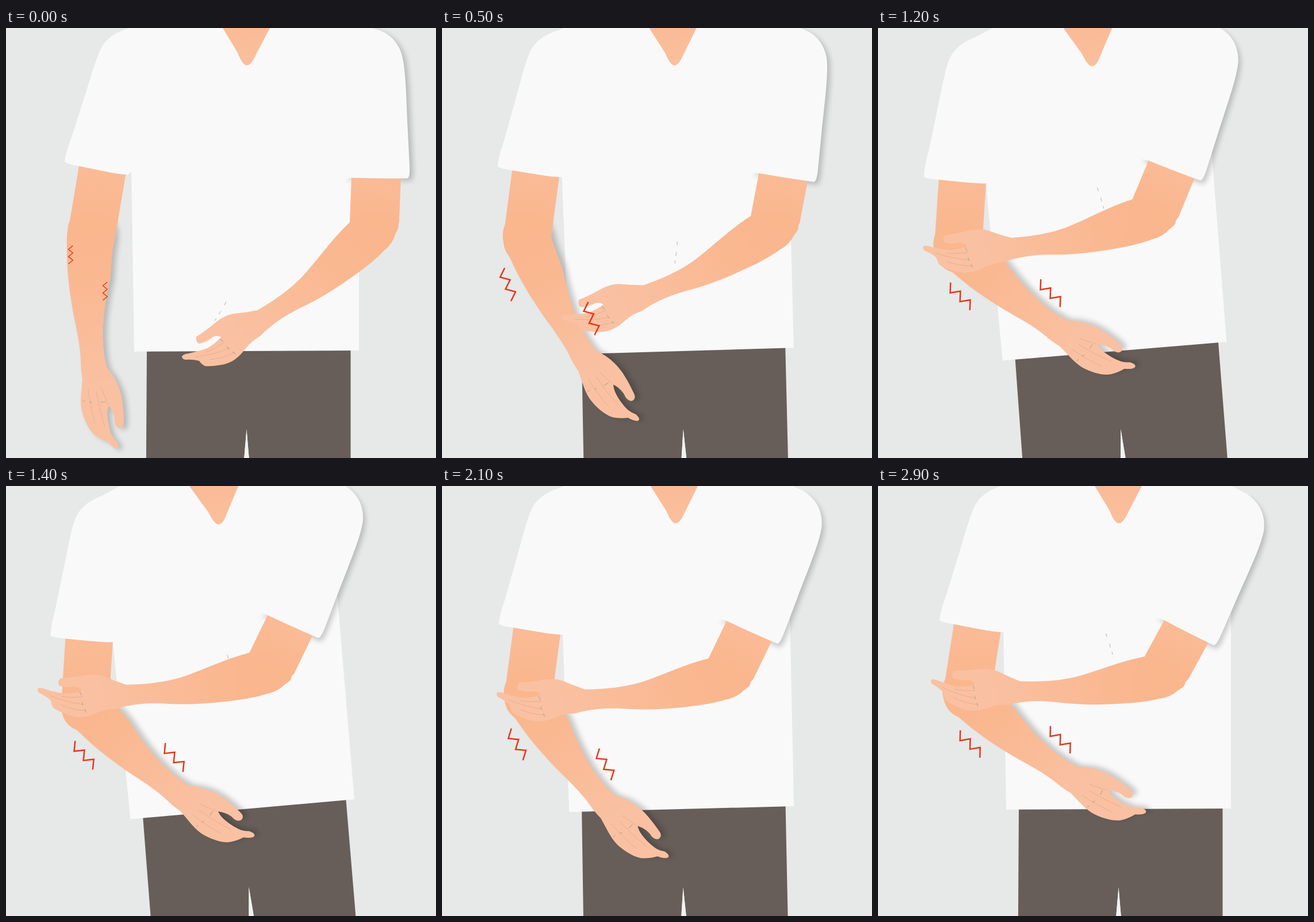
Write an HTML page that moves like this. It is 748 by 748 pixels and loops after 3 s.

```html
<!DOCTYPE html>
<html lang="en">
<head>
<meta charset="utf-8">
<title>Forearm pain</title>
<style>
  html, body { margin: 0; width: 100%; height: 100%; overflow: hidden; background: #e6e9e8; }
  svg { display: block; width: 100vw; height: 100vh; }
  .white { fill: #f9f9f9; }
  .shade { fill: #000; opacity: .2; filter: url(#soft); }
  .crease { fill: none; stroke: #dfa283; stroke-width: .8; stroke-opacity: .75; }
  .dash { fill: none; stroke: #b5a79c; stroke-width: 1.1; }
  .zig { fill: none; stroke: #e8351a; stroke-width: 2.5; }
</style>
</head>
<body>
<svg viewBox="0 0 748 748">
  <defs>
    <filter id="soft" x="-20%" y="-20%" width="140%" height="140%"><feGaussianBlur stdDeviation="5"/></filter>
    <linearGradient id="upperL" gradientUnits="userSpaceOnUse" x1="165" y1="240" x2="150" y2="355">
      <stop offset="0" stop-color="#fabb96"/><stop offset="1" stop-color="#fab68d"/>
    </linearGradient>
    <linearGradient id="foreL" gradientUnits="userSpaceOnUse" x1="148" y1="355" x2="160" y2="630">
      <stop offset="0" stop-color="#fab68d"/><stop offset=".3" stop-color="#fab891"/><stop offset="1" stop-color="#f9c1a2"/>
    </linearGradient>
    <linearGradient id="upperR" gradientUnits="userSpaceOnUse" x1="645" y1="262" x2="640" y2="350">
      <stop offset="0" stop-color="#fabb96"/><stop offset="1" stop-color="#fab68d"/>
    </linearGradient>
    <linearGradient id="foreR" gradientUnits="userSpaceOnUse" x1="640" y1="350" x2="400" y2="545">
      <stop offset="0" stop-color="#fab68d"/><stop offset=".3" stop-color="#fab891"/><stop offset="1" stop-color="#f9c1a2"/>
    </linearGradient>
    <linearGradient id="neck" x1="0" y1="0" x2="0" y2="1">
      <stop offset="0" stop-color="#fab993"/><stop offset="1" stop-color="#fabf9c"/>
    </linearGradient>
  </defs>
  <rect width="748" height="748" fill="#e6e9e8"/>

  <g data-rig="torso">
    <path fill="#675e59" d="M245 555H599.500V810H428L418.500 698L409 810H243.500Z"/>
    <path fill="#f1f3f2" d="M418.500 698L428 810H409Z"/>
    <path class="white" d="M255 -16L355 -60H500L608 -3Q640 14 640 70L614 200V561L223 563L218 240L205 60Z"/>
    <path fill="url(#neck)" d="M349 -50L377 0L403 43Q411 64.500 419 65Q427 64 434 48L459 0L484 -50Z"/>
  </g>

  <g data-rig="foreL"><path class="shade" data-copy="armL" transform="translate(7 3)"/></g>
  <g data-rig="sleeveL">
    <path fill="url(#upperL)" d="M129 228L210 240L208.500 253.500L188.500 372A41 41 0 0 1 107.500 360Q106 345 111 335Z"/>
    <path class="white" d="M300 -20L255 -16L215 0Q178 10 165 36C153 62 143 102 130 140Q122 166 113 193Q104 216 102 232Q104 236 126 240L170 249Q200 255 212 255L218 250L240 100Z"/>
  </g>
  <g data-rig="foreL">
    <path fill="url(#foreL)" data-copy="armL"/>
    <path class="crease" d="M143 628Q146 656 155 688M157 632Q162 664 172 694M166 626Q171 640 178 655"/>
    <path class="dash" d="M133 649H137.500M145 650L150 651.500M164 651.500L173 650"/>
    <path class="dash" stroke-opacity=".8" d="M383 476L380 482M374 492.500L370 498M366 505L363 509"/>
  </g>

  <g data-rig="sleeveR">
    <path class="shade" data-copy="sleeveEdge" transform="translate(6 4)"/>
  </g>
  <g data-rig="upperR">
    <path fill="url(#upperR)" d="M601.500 245H687.500L684 336Q680 350 676 362L625 380L598 338Z"/>
  </g>
  <g data-rig="sleeveR">
    <path class="white" data-copy="sleeve"/>
  </g>
  <g data-rig="foreR">
    <path fill="url(#foreR)" data-copy="armR"/>
    <path class="crease" d="M329 572Q360 569 389 557M348 564Q366 557 381 546M354 577Q380 574 398 564"/>
    <path class="dash" d="M372 541L378 545M384 554.500L389 559M394 563L399 567"/>
  </g>

  <g data-rig="pain">
    <path class="zig" data-copy="zig" transform="translate(-65 63)"/>
    <path class="zig" data-copy="zig" transform="translate(43 177)"/>
  </g>
</svg>
<script>
const LOOP = 3000, STEP = 100;

const sleeveOuter = "M632 0Q674 5 688 44C696 72 696 120 699 180L702 240Q703 261 698 261.500" +
  "Q648 262 601 260.500L585 262";

const shapes = {
  armL: "M109 346A41 41 0 0 1 189 353Q189 368 187 378C183 396 184 420 181 438" +
    "C174 470 167 510 169 545Q170 572 176 591Q190 607 196 624C203 640 205 666 205 688" +
    "Q204 696 197 696Q191 695 189 686Q190 672 179 657C173 668 178 694 184 708" +
    "Q187 714 193 720Q198 731 192 732Q186 731 178 720Q168 717 157 710" +
    "C146 703 135 682 131 662Q129 650 131 632L133 610Q130 596 130 576" +
    "C128 540 119 512 114 478C109 446 106 420 106 384Q105 354 109 346Z",
  armR: "M598 338Q625 318 660 322Q682 330 683 345Q681 352 678 357Q673 375 658 387" +
    "C642 404 622 419 605 431C572 455 540 474 510 488C482 502 462 516 442 536" +
    "Q428 544 418 556C404 575 392 583 374 586Q356 589 346 588Q340 585 336 579" +
    "Q324 576 312 577Q306 576 306 571Q309 567 318 566Q336 562 350 557Q364 549 374 538" +
    "Q371 534 361 537Q348 547 336 549Q330 547 331 537Q350 525 366 511" +
    "Q382 499 396 497Q417 495 437 491C468 473 492 456 514 434C542 404 564 370 598 338Z",
  sleeve: sleeveOuter + "L590 100L560 -2Z",
  sleeveEdge: sleeveOuter + "L612 242L650 60Z",
  zig: "M7-28.500" + [1, 2, 3, 4, 5].map(i => `L${i % 2 ? -7 : 7} ${-28.5 + 11.4 * i}`).join("")
};
for (const p of document.querySelectorAll("[data-copy]")) p.setAttribute("d", shapes[p.dataset.copy]);

// Keys are [seconds, value]; angles are in degrees, lift in pixels.
const tracks = {
  lean:   [[0, 0], [.15, .1], [.5, 1.4], [.9, 3.05], [1.2, 4.5], [1.35, 4.85], [1.7, 3.05], [2.1, 1.2], [2.4, 0]],
  shift:  [[0, 0], [.5, .65], [.9, 1.15], [1.25, 1.3], [1.7, .95], [2.1, .75], [2.4, .65]],
  lift:   [[0, 0], [.5, 4], [2.1, 4], [2.9, 1]],
  swing:  [[0, 0], [.5, 24.4], [.9, 46.2], [1.1, 49.2], [1.2, 48.6], [1.7, 38], [1.97, 33], [2.1, 33.8], [2.4, 41.5], [2.9, 49.3]],
  reach:  [[0, 0], [.5, 8.5], [.9, 15.5], [1.2, 20.4], [1.4, 23.7], [1.7, 24.1], [2.1, 23.6], [2.9, 26.4]],
  rub:    [[0, 0], [.5, 10.7], [.9, 19.5], [1.2, 25.9], [1.4, 29], [1.7, 29.7], [2.1, 29.4], [2.9, 32.4]],
  throb:  [[0, .555], [.2, 1.2], [.4, 1]]
};

// Monotone cubic interpolation: peaks lie exactly on keys.
function value(keys, t) {
  const n = keys.length;
  if (t <= keys[0][0]) return keys[0][1];
  if (t >= keys[n - 1][0]) return keys[n - 1][1];
  const i = keys.findIndex(k => k[0] > t) - 1;
  const slope = j => (keys[j + 1][1] - keys[j][1]) / (keys[j + 1][0] - keys[j][0]);
  const tangent = j => {
    if (j === 0 || j === n - 1) return slope(Math.min(j, n - 2)) * .7;
    const a = slope(j - 1), b = slope(j);
    return a * b <= 0 ? 0 : 2 * a * b / (a + b);
  };
  const [t0, v0] = keys[i], [t1, v1] = keys[i + 1];
  const h = t1 - t0, u = (t - t0) / h, w = 1 - u;
  return v0 * (1 + 2 * u) * w * w + v1 * u * u * (3 - 2 * u) +
    h * u * w * (tangent(i) * w - tangent(i + 1) * u);
}

const rotate = (a, x, y) => `rotate(${a.toFixed(3)} ${x} ${y}) `;
const move = (x, y) => `translate(${x.toFixed(2)} ${y.toFixed(2)}) `;
const parts = [...document.querySelectorAll("[data-rig]")];

function draw(ms) {
  const v = {};
  for (const k in tracks) v[k] = value(tracks[k], ms / 1000);
  const torso = rotate(-v.lean, 418, 650);
  const sleeveL = torso + rotate(-v.shift, 150, -200);
  const foreL = sleeveL + move(0, -v.lift) + rotate(v.lean + v.shift - v.swing, 148.5, 359.5);
  const sleeveR = torso + rotate(v.lean + v.reach, 608, 25);
  const upperR = sleeveR + move(v.reach * .05, -v.reach * .1);
  const foreR = upperR + rotate(v.rub - v.reach, 630, 345);
  const pain = foreL + `translate(148.5 359.5) scale(${v.throb.toFixed(3)})`;
  const pose = { torso, sleeveL, foreL, sleeveR, upperR, foreR, pain };
  for (const p of parts) p.setAttribute("transform", pose[p.dataset.rig]);
}

function tick() {
  const ms = performance.now() % LOOP;
  draw(Math.floor(ms / STEP) * STEP);
  requestAnimationFrame(tick);
}
tick();
</script>
</body>
</html>
```
